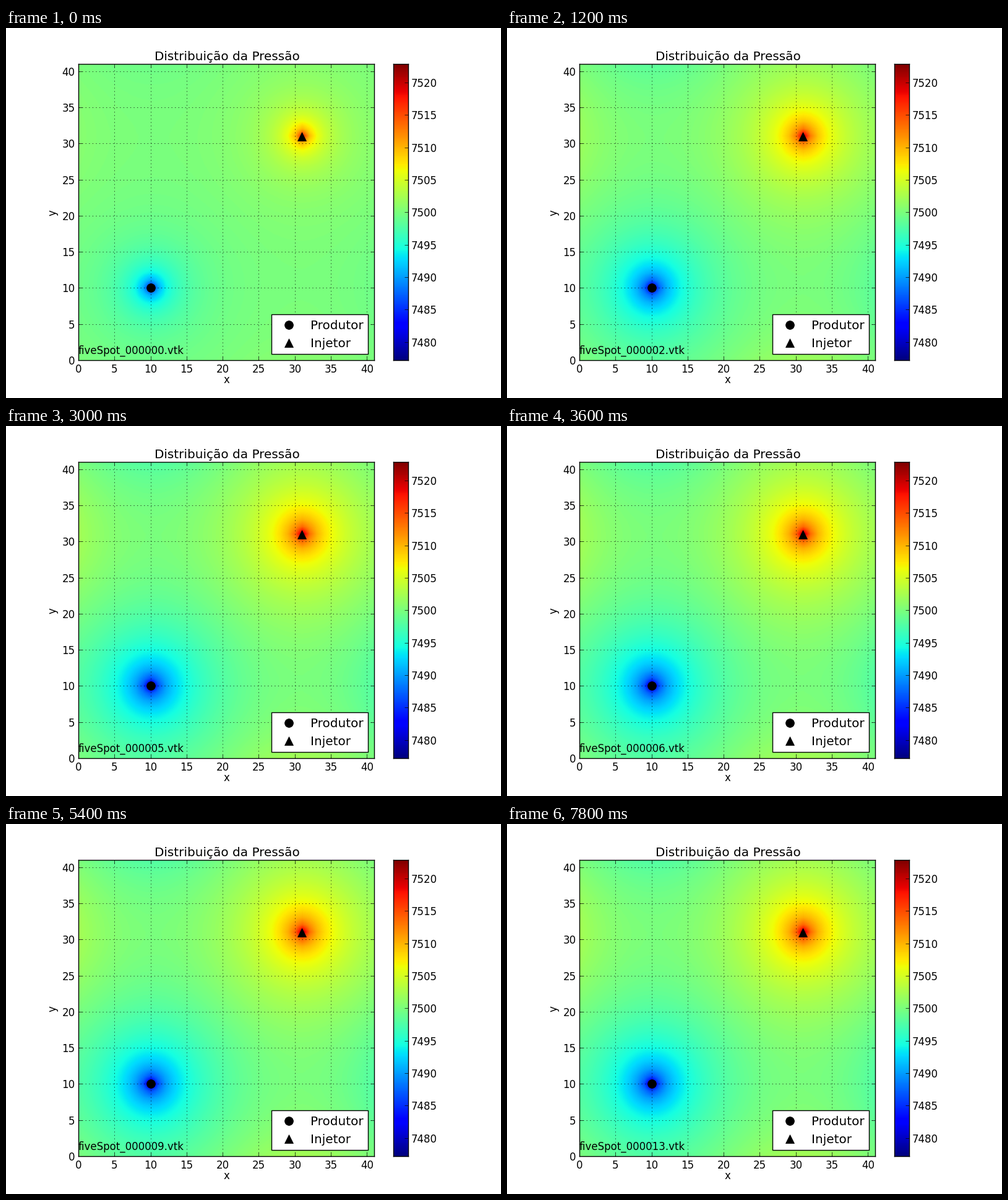
Recreate the animation shown at these times as a matplotlib script. Size 800x597 px, loop 8000 ms.

```python
import numpy as np
import matplotlib.pyplot as plt
from matplotlib.animation import FuncAnimation
from matplotlib.lines import Line2D
from matplotlib.patches import Rectangle

plt.style.use("classic")
plt.rcParams["font.family"] = "DejaVu Sans"

W, H, DPI = 800, 597, 100
N = 41                               # cells per side, periodic domain
PRODUCER, INJECTOR = 10, 31
P0, PEAK = 7500.0, 21.6              # mean pressure, steady well amplitude
P_MIN, P_MAX = 7477.2, 7522.85
DIFFUSION = 37.0                     # diffusivity times the time step
TICK_MS, TICKS_PER_STEP, TICKS = 200, 3, 40
SMALL, LARGE = 12, 14.4

LEFT, TOP, SIDE = 117, 58, 478       # plot square in pixels
BAR_X, BAR_W = 626, 24
BOTTOM = TOP + SIDE

# Spectral form of the five-point Laplacian and the well sources
wave = 2 - 2 * np.cos(2 * np.pi * np.arange(N) / N)
LAPLACE = wave[:, None] + wave[None, :]
wells = np.zeros((N, N))
wells[INJECTOR, INJECTOR] = 1
wells[PRODUCER, PRODUCER] = -1
SOURCE = np.fft.fft2(wells)
STEADY = SOURCE / np.where(LAPLACE == 0, 1, LAPLACE)
STEADY *= PEAK / np.fft.ifft2(STEADY).real.max()


def pressure(step):
    """Field after step + 1 implicit Euler steps from a uniform state."""
    decay = (1 + DIFFUSION * LAPLACE) ** -(step + 1.0)
    field = P0 + np.fft.ifft2(STEADY * (1 - decay)).real
    return np.pad(field, ((1, 2), (1, 2)), mode="wrap")


fig = plt.figure(figsize=(W / DPI, H / DPI), dpi=DPI, facecolor="white")


def place(x, y):
    return x / W, 1 - y / H


def add_axes(x, width):
    return fig.add_axes([x / W, 1 - BOTTOM / H, width / W, SIDE / H])


def label(x, y, text, size=SMALL, ha="center", **kw):
    return fig.text(*place(x, y), text, size=size, ha=ha, va="baseline",
                    zorder=6, **kw)


# Pressure map
ax = add_axes(LEFT, SIDE)
image = ax.imshow(pressure(0), cmap="jet", vmin=P_MIN, vmax=P_MAX,
                  origin="lower", interpolation="bilinear", aspect="auto",
                  extent=(-1.45, N + 1.55, -1.45, N + 1.55))
ax.plot(PRODUCER, PRODUCER, "ko", ms=10)
ax.plot(INJECTOR, INJECTOR, "k^", ms=10)
ax.set(xlim=(0, N), ylim=(0, N))
ticks = np.arange(0, N, 5)
ax.set_xticks(ticks, labels=[])
ax.set_yticks(ticks, labels=[])
ax.grid(True)

for v in ticks:
    offset = v * SIDE / N
    label(LEFT + offset, 556, str(v))
    label(LEFT - 5.5, BOTTOM - offset + 7, str(v), ha="right")

label(357, 52, "Distribuição da Pressão", LARGE)
label(356.5, 573, "x")
label(80, 298, "y", rotation=90, rotation_mode="anchor")

# Colour scale
bar = add_axes(BAR_X, BAR_W)
bar.imshow(np.linspace(0, 1, 256)[:, None], cmap="jet", origin="lower",
           interpolation="nearest", aspect="auto",
           extent=(0, 1, P_MIN, P_MAX))
levels = np.arange(7480, 7521, 5)
bar.set_xticks([])
bar.set_yticks(levels, labels=[])
bar.tick_params(axis="y", left=False, right=True)
for p in levels:
    y = TOP + SIDE * (P_MAX - p) / (P_MAX - P_MIN)
    label(655, y + 7, str(p), ha="left")

# Legend
x0, y0 = place(429, 526)
fig.add_artist(Rectangle((x0, y0), 156 / W, 64 / H, fc="white", ec="black",
                         lw=1, zorder=4))
for y, marker, name in ((478.5, "o", "Produtor"), (507.5, "^", "Injetor")):
    mx, my = place(456.5, y)
    fig.add_artist(Line2D([mx], [my], marker=marker, color="black", ms=10,
                          ls="none", zorder=5))
    label(492, y + 7.5, name, LARGE, ha="left")

file_name = label(LEFT, 526, "", ha="left")


def update(tick):
    step = tick // TICKS_PER_STEP
    image.set_data(pressure(step))
    file_name.set_text(f"fiveSpot_{step:06d}.vtk")
    return image, file_name


anim = FuncAnimation(fig, update, frames=TICKS, interval=TICK_MS,
                     repeat=True, repeat_delay=0)
plt.show()
```
